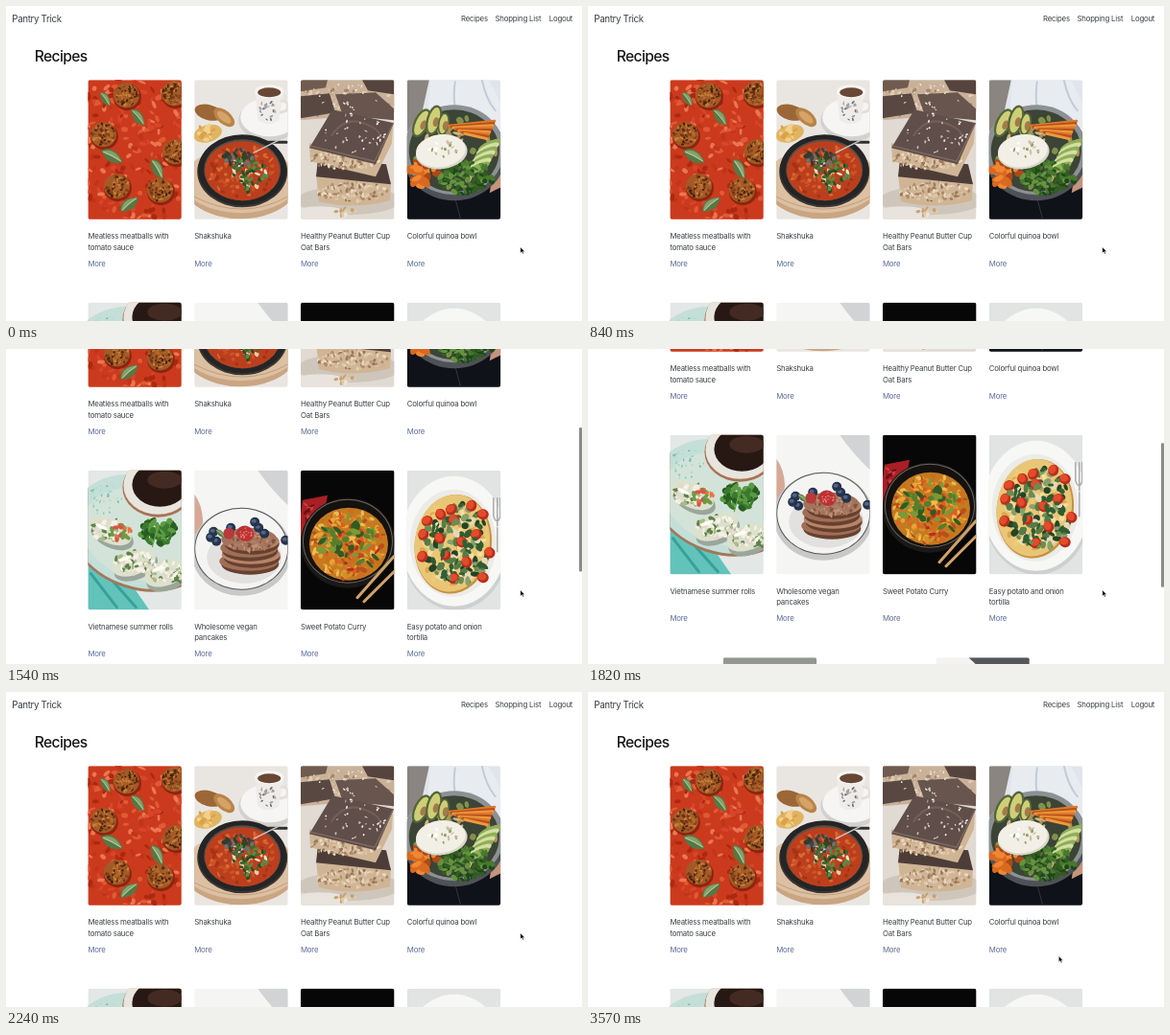
Animation, 600 px wide and 329 px high, one loop 3640 ms. Source, as an HTML page:

```html
<!DOCTYPE html>
<html lang="en">
<head>
<meta charset="utf-8">
<title>Recipes</title>
<style>
  html, body { margin: 0; width: 100%; height: 100%; overflow: hidden; background: #fff; }
  svg { display: block; width: 600px; height: 329px; }
  text { font: 7.8px Inter, sans-serif; letter-spacing: -.025em; fill: #3c4044; }
  .brand { font-size: 9.75px; letter-spacing: -.035em; }
  .heading { font-size: 15.6px; font-weight: 500; letter-spacing: -.04em; fill: #181818; }
  .more { fill: #5b6c99; }
</style>
</head>
<body>
<svg viewBox="0 0 600 329">
  <defs><clipPath id="photo"><rect width="97.3" height="145.5" rx="2"/></clipPath></defs>
  <g id="page">
    <text class="brand" x="6.3" y="16.8">Pantry Trick</text>
    <text x="474" y="16.2">Recipes</text>
    <text x="509.5" y="16.2">Shopping List</text>
    <text x="565.7" y="16.2">Logout</text>
    <text class="heading" x="29.8" y="58">Recipes</text>
  </g>
  <rect id="thumb" x="597" width="3" height="150.5" rx="1" fill="#8b8b8b"/>
  <path id="cursor" d="M0 0V6.3L1.5 5L2.5 7.3L3.6 6.8L2.6 4.6H4.6Z" fill="#000" stroke="#fff" stroke-width=".5"/>
</svg>
<script>
const $ = id => document.getElementById(id);

let seed = 7;
const random = () => (seed = seed * 16807 % 2147483647) / 2147483647;
const between = (a, b) => a + random() * (b - a);

const oval = (x, y, rx, ry, fill, turn = 0) =>
  `<ellipse rx="${rx}" ry="${ry}" fill="${fill}" transform="translate(${x} ${y}) rotate(${turn})"/>`;
const shape = (d, fill) => `<path d="${d}" fill="${fill}"/>`;
const line = (d, color, width) =>
  `<path d="${d}" fill="none" stroke="${color}" stroke-width="${width}" stroke-linecap="round"/>`;
const back = fill => `<rect width="98" height="146" fill="${fill}"/>`;

// Random flecks inside an ellipse
function flecks(count, x, y, rx, ry, size, colors) {
  let out = '';
  for (let i = 0; i < count; i++) {
    const angle = between(0, 6.283), r = Math.sqrt(random());
    out += oval(x + r * rx * Math.cos(angle), y + r * ry * Math.sin(angle),
      between(.5, 1) * size, between(.25, .6) * size,
      colors[i % colors.length], between(0, 180));
  }
  return out;
}

const leaf = (x, y, turn, size = 9) =>
  `<g transform="translate(${x} ${y}) rotate(${turn}) scale(${size / 9})">` +
  shape('M-9 0Q-3-9 9 0Q1 8-9 0', '#557844') + shape('M-8 0Q-2-7 8 0Z', '#86a06a') +
  line('M-7 0Q0-1 7 0', '#bccca2', .7) + '</g>';

const meatball = (x, y) => oval(x + 1, y + 2, 14.5, 14, '#8d2410') + oval(x, y, 13.5, 13, '#a35a26') +
  flecks(60, x, y, 12, 11.5, 2.4, ['#693014', '#c98339', '#81421a', '#b46c2b', '#45220f']);

const meatballs = () => back('#cb3a1d') +
  flecks(260, 48, 73, 66, 88, 4.5, ['#e05a34', '#ab2811', '#d8452a', '#c13417', '#ea7750']) +
  [[40, 16], [90, 14], [16, 57], [91, 75], [75, 115], [30, 111]].map(p => meatball(...p)).join('') +
  leaf(52, 39, 50, 11) + leaf(25, 80, 28, 13) + leaf(72, 93, 60, 12) + leaf(43, 130, -40, 12) + leaf(18, 20, 55);

const shakshuka = () => back('#e9e6e2') + oval(48, 108, 60, 37, '#caa582') + oval(48, 105, 60, 34, '#dcc0a2') +
  line('M0 122Q50 148 97 122', '#bb9371', .8) +
  oval(78, 42, 32, 22, '#d3d1d0') + oval(78, 39, 30, 20, '#f6f5f4') +
  shape('M63 12L66 42Q77 50 88 42L93 12Z', '#eeece8') + line('M91 22q9 0 5 10l-6 2', '#e3dfda', 3) +
  oval(78, 12, 15, 7, '#f8f6f3') + oval(78, 13, 12, 5, '#694735') +
  flecks(22, 77, 31, 10, 11, 2.2, ['#6a7080', '#c5a899', '#9a9ca2']) +
  oval(15, 34, 15, 8, '#9c6736', 15) + oval(31, 39, 13, 7, '#b98349', 40) + oval(31, 39, 9, 4, '#d5a366', 40) +
  oval(14, 56, 15, 9, '#e1b462', -15) + flecks(16, 14, 55, 12, 8, 4, ['#f0d18b', '#dca148']) +
  line('M55 65L96 65', '#30302f', 3) +
  oval(50, 96, 47, 37, '#3a3633') + oval(50, 94, 46, 37, '#252525') + oval(50, 94, 40, 32, '#57504a') +
  oval(50, 95, 39, 31, '#bc3f1d') +
  flecks(80, 50, 95, 35, 27, 3.5, ['#cd5427', '#a63216', '#d96a33']) +
  flecks(22, 54, 98, 21, 17, 4, ['#f1e4d0', '#f5c9a4']) +
  flecks(36, 46, 82, 16, 9, 4, ['#47413f', '#766d69', '#313c2c']) +
  flecks(44, 56, 98, 20, 18, 4, ['#3f6b2d', '#5f8743', '#284c22']) +
  line('M62 76L88 63', '#c8c5c1', 1.5);

const oats = (d, x, y, rx, ry) => shape(d, '#cfb595') +
  flecks(100, x, y, rx, ry, 2.6, ['#ead9c0', '#b08c67', '#dec6a7', '#98775a']);

const oatBars = () => back('#e0dad2') + shape('M0 0H98V34L0 42Z', '#c9b199') +
  flecks(80, 50, 22, 56, 18, 3, ['#e4d0b6', '#a5866a', '#d4baa0']) +
  shape('M0 17L30 14L36 34L0 40Z', '#594842') + shape('M36 15L78 13L97 30V42L44 37Z', '#68554e') +
  shape('M0 0H28L26 8L0 12Z', '#705b50') + shape('M64 0H97V15L70 11Z', '#55443d') +
  oval(50, 126, 54, 15, '#cfc6bb') +
  oats('M16 98L94 106L93 126Q55 136 19 127Z', 55, 117, 37, 10) +
  shape('M18 82L89 88L94 109L16 101Z', '#4d3d38') +
  oats('M9 66L77 82L96 47L95 66L78 101L10 85Z', 46, 83, 36, 10) +
  shape('M33 31L97 45L78 88L9 71Z', '#5f4e49') + line('M10 69L77 85L96 46', '#806b61', 1.2) +
  line('M32 58Q46 38 65 45T82 60', '#745e56', 2) +
  flecks(36, 56, 55, 34, 21, 1.8, ['#f5efe8', '#c5bab2']) + flecks(24, 48, 18, 45, 14, 1.7, ['#eee8e1']) +
  oval(20, 140, 29, 8, '#e8e3dd') + flecks(9, 46, 138, 10, 4, 4, ['#c7a476', '#e4cfac']);

const quinoaBowl = () => back('#e1e5eb') + shape('M0 0H23L16 32L0 55Z', '#8a8580') +
  shape('M24 0H85L98 25V62H20Z', '#e8ebf0') + line('M50 2Q47 22 52 35M78 0Q82 20 92 32', '#c5cbd5', 2) +
  shape('M0 97H98V146H0Z', '#101219') + line('M49 120L56 146', '#313640', 1) +
  shape('M90 90L98 82V112L86 118Z', '#c4947b') +
  oval(49, 77, 54, 49, '#4e5256') + oval(49, 73, 52, 47, '#8d9193') + oval(49, 74, 47, 43, '#3c4436') +
  flecks(35, 50, 75, 42, 37, 6, ['#d1b67d', '#82914a', '#ad9058']) +
  [[15, 45, 8, -65], [28, 42, 8, -75], [38, 46, 6, 100]].map(([x, y, r, turn]) =>
    oval(x, y, r * 2, r, '#536738', turn) + oval(x, y, r * 1.7, r * .7, '#cfce78', turn) +
    oval(x + 2, y + 2, 5, 3, '#a27b49', turn)).join('') +
  Array.from({ length: 9 }, (_, i) => line(`M${44 + i * 2} ${48 + i}L${91 - i} ${43 + i * 2.3}`,
    ['#dd7a2c', '#b95018', '#ef993e'][i % 3], 3)).join('') +
  Array.from({ length: 7 }, (_, i) => oval(86 - i * 2, 68 + i * 4, 13, 4, i % 2 ? '#d4dfa2' : '#8fae58', -25)).join('') +
  flecks(30, 16, 95, 16, 16, 7, ['#d9691f', '#ef8733', '#ad4917']) +
  flecks(130, 60, 102, 29, 17, 4.5, ['#315d20', '#47792e', '#20461a', '#65933f']) +
  oval(36, 76, 27, 17, '#d9d5c9', -8) + oval(35, 74, 26, 17, '#f2efe6', -8) +
  flecks(18, 37, 73, 17, 9, 3, ['#cebfa7', '#ffffff', '#96a267']);

const riceRoll = (x, y, turn) => oval(x + 2, y + 5, 24, 13, '#9ba69b', turn) + oval(x, y, 24, 13, '#dbe1cc', turn) +
  flecks(60, x, y, 20, 11, 4, ['#f4f3e8', '#a8ba87', '#5d8246', '#e1d8c9', '#f5eee7']) +
  oval(x - 9, y - 4, 7, 2, '#fffdf5', turn);

const summerRolls = () => back('#e3e7e5') + shape('M0 80L46 120L64 146H0Z', '#62c3bb') +
  line('M3 108L30 143M12 100L50 143', '#37a199', 3) +
  oval(56, 66, 77, 59, '#a37758', 18) + oval(56, 64, 76, 58, '#c3dfd7', 18) + oval(55, 67, 63, 47, '#d3e3d9', 18) +
  flecks(30, 17, 31, 18, 17, 2, ['#79c1b1', '#b1d9cc']) +
  oval(73, 18, 37, 31, '#aa7154') + oval(73, 16, 36, 30, '#e7e5dd') + oval(75, 15, 29, 23, '#271814') +
  oval(80, 10, 18, 9, '#432b24') + riceRoll(23, 63, 25) + riceRoll(48, 96, -22) + riceRoll(82, 107, -20) +
  flecks(18, 34, 64, 12, 8, 4, ['#e77440', '#d75448', '#6d9b41']) +
  flecks(60, 73, 63, 18, 14, 6, ['#3b7a2e', '#5b9a42', '#285d23']) + line('M73 58L67 80', '#6ba24a', 1.2);

const pancakes = () => back('#f5f5f4') + shape('M66 0H98V37Q80 20 66 0Z', '#d2d3d4') +
  shape('M0 25Q8 35 9 53L4 75L0 78Z', '#d6a996') + oval(49, 85, 52, 46, '#c9c9c9') +
  oval(49, 82, 49, 43, '#545658') + oval(49, 82, 48, 42, '#f4f4f3') + oval(52, 91, 39, 27, '#e2e1e0') +
  [98, 91, 84, 77].map((y, i) => oval(58 + i % 2 * 2, y, 30 - i / 2, 11, '#67412f') +
    oval(57 + i % 2 * 2, y - 3, 31 - i / 2, 10, i % 2 ? '#b68469' : '#a06e56')).join('') +
  oval(57, 72, 29, 12, '#a3735c') + flecks(75, 57, 73, 27, 11, 3, ['#c09175', '#805340', '#ad7e65']) +
  oval(53, 66, 9, 8, '#bd3133', 25) + flecks(14, 53, 66, 7, 6, 1.5, ['#e98775']) +
  [[67, 60], [73, 66], [63, 54], [20, 64], [23, 74], [17, 70], [95, 73], [38, 60]].map(([x, y]) =>
    oval(x, y, 5, 5, '#26334e') + oval(x - 1, y - 1, 2.5, 2, '#536685')).join('') +
  oval(36, 66, 6, 6, '#b83a3b') + leaf(27, 66, 40, 6);

const curry = () => back('#080707') + shape('M2 31L28 26L19 72L0 78V45Z', '#a81f25') +
  flecks(15, 12, 48, 10, 20, 4, ['#d13a37', '#64121a']) +
  oval(49, 76, 49, 47, '#1b1917') + oval(49, 74, 47, 44, '#6b655c') + oval(49, 74, 46, 43, '#14110e') +
  oval(50, 77, 41, 38, '#c47a20') +
  flecks(170, 50, 77, 38, 35, 4.5, ['#e5a535', '#ce6d20', '#edbd51', '#b94f1c', '#d78e28']) +
  flecks(30, 50, 78, 34, 31, 4, ['#bc2d1d', '#e15b26']) +
  flecks(40, 52, 76, 33, 29, 6, ['#587e2b', '#7b9937', '#315b22']) +
  line('M59 133L97 90M66 137L97 106', '#d1a267', 3);

const tortilla = () => back('#e2e4e4') + oval(50, 77, 56, 69, '#cdd0d0') + oval(49, 74, 55, 68, '#f7f7f5') +
  oval(48, 76, 45, 56, '#ebebe8') + oval(48, 77, 40, 52, '#c7903f', 8) + oval(47, 76, 39, 51, '#e9c676', 8) +
  flecks(90, 47, 77, 34, 45, 5, ['#f3dda0', '#d9a94f', '#edcc77']) +
  flecks(100, 53, 76, 34, 42, 6, ['#315b31', '#577b48', '#214427', '#86a16c', '#e7d9b7']) +
  [[35, 46], [46, 41], [49, 52], [67, 37], [79, 46], [17, 67], [16, 90], [34, 71], [40, 88], [49, 113],
    [62, 96], [72, 67], [86, 86], [79, 112], [57, 75], [21, 53]].map(([x, y]) =>
    oval(x, y, 6, 5.5, '#b92d1c', x * 7) + oval(x - 1, y - 1, 4.6, 3.8, '#e34b2b', x * 7)).join('') +
  flecks(30, 52, 77, 33, 41, 5, ['#315f32', '#6b8c54']) +
  line('M94 60V85M90 29V48Q94 58 97 48V29M94 29V58', '#a8abad', 1.5);

const greyTable = () => back('#929791') + oval(45, 85, 48, 52, '#e6e4de') + oval(45, 85, 36, 39, '#b77b39');
const whiteTable = () => back('#f4f3f1') + shape('M34 0H98V60Z', '#54585b') + oval(45, 90, 45, 44, '#cd9b4b');

const cards = [
  [0, 0, meatballs, 'Meatless meatballs with', 'tomato sauce'],
  [1, 0, shakshuka, 'Shakshuka'],
  [2, 0, oatBars, 'Healthy Peanut Butter Cup', 'Oat Bars'],
  [3, 0, quinoaBowl, 'Colorful quinoa bowl'],
  [0, 1, summerRolls, 'Vietnamese summer rolls'],
  [1, 1, pancakes, 'Wholesome vegan', 'pancakes'],
  [2, 1, curry, 'Sweet Potato Curry'],
  [3, 1, tortilla, 'Easy potato and onion', 'tortilla'],
  [.5, 2, greyTable, ''],
  [2.5, 2, whiteTable, '']
];
$('page').innerHTML += cards.map(([column, row, draw, title, rest = '']) =>
  `<g transform="translate(${85.4 + column * 110.8} ${77.2 + row * 232.5})">
    <g clip-path="url(#photo)">${draw()}</g>
    <text y="166">${title}</text><text y="177.7">${rest}</text><text class="more" y="194.4">More</text>
  </g>`).join('');

const LOOP = 3640, STEP = 70;
// [time, offset]: a quick flick down, a rest, a flick back to the top
const scrollKeys = [[1050, 0], [1120, 6], [1190, 36], [1540, 183], [1610, 207], [1680, 220],
  [1820, 220], [1890, 190], [2030, 30], [2100, 0]];
const clamp = v => Math.min(1, Math.max(0, v));

function track(keys, t) {
  const next = keys.findIndex(key => key[0] > t);
  if (next < 0) return keys[keys.length - 1][1];
  if (!next) return keys[0][1];
  const [t0, a] = keys[next - 1], [t1, b] = keys[next];
  return a + (b - a) * (t - t0) / (t1 - t0);
}

function frame() {
  const t = Math.floor(performance.now() % LOOP / STEP) * STEP;
  const scroll = track(scrollKeys, t);
  $('page').setAttribute('transform', `translate(0 ${-scroll})`);
  $('thumb').setAttribute('y', 1 + scroll * .442);
  $('thumb').setAttribute('opacity', t < 1120 ? 0 : clamp((2240 - t) / 140));
  // The pointer speeds up until the loop cuts
  const move = clamp((t - 3290) / 280) ** 2;
  $('cursor').setAttribute('transform', `translate(${535.8 - 45.5 * move} ${251.8 + 24 * move})`);
  requestAnimationFrame(frame);
}
frame();
</script>
</body>
</html>
```
